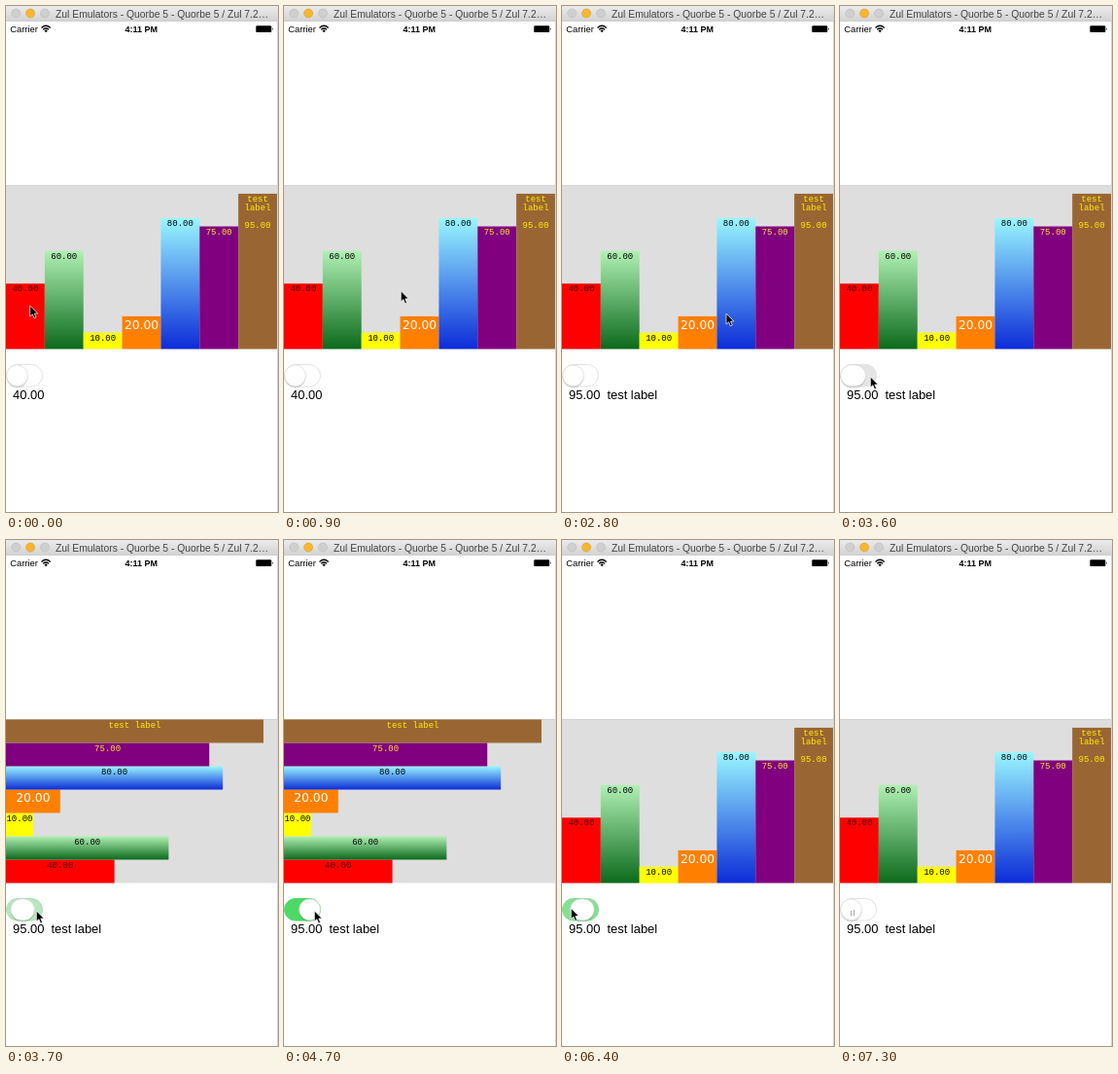
An HTML page that plays this animation: 280 by 520 pixels, repeating every 8.4 s.

```html
<!DOCTYPE html>
<html lang="en">
<head>
<meta charset="utf-8">
<title>Bar chart demo</title>
<style>
  html, body { margin: 0; width: 100%; height: 100%; overflow: hidden; background: #fff; }
  svg { display: block; width: 280px; height: 520px; }
  text { font-family: "Liberation Sans", Arial, sans-serif; white-space: pre; }
  .mono { font: 9px "Liberation Mono", "Courier New", monospace; text-anchor: middle; }
  .big { font: 12.3px "DejaVu Sans", Verdana, sans-serif; text-anchor: middle; }
</style>
</head>
<body>
<svg viewBox="0 0 280 520">
  <defs>
    <linearGradient id="title" x2="0" y2="1">
      <stop stop-color="#ebebeb"/><stop offset="1" stop-color="#d3d3d3"/>
    </linearGradient>
    <linearGradient id="green" x2="0" y2="1">
      <stop stop-color="#b0f0b4"/><stop offset="1" stop-color="#0c6a1c"/>
    </linearGradient>
    <linearGradient id="blue" x2="0" y2="1">
      <stop stop-color="#98f6ff"/><stop offset="1" stop-color="#0c2cd8"/>
    </linearGradient>
  </defs>

  <rect width="280" height="520" fill="#fff"/>

  <rect width="280" height="15.5" fill="url(#title)"/>
  <path d="M0 15.5H280" stroke="#c4c4c4" stroke-width=".7"/>
  <g stroke-width=".6">
    <circle cx="10.3" cy="7.5" r="4.5" fill="#cfcfcf" stroke="#bbb"/>
    <circle cx="25.1" cy="7.5" r="4.5" fill="#f8b630" stroke="#dc9c24"/>
    <circle cx="40" cy="7.5" r="4.5" fill="#cfcfcf" stroke="#bbb"/>
  </g>
  <text x="51" y="11.5" font-size="10.35" fill="#444">Zul Emulators - Quorbe 5 - Quorbe 5 / Zul 7.2…</text>

  <text x="4.2" y="27" font-size="9.4">Carrier</text>
  <g fill="none" stroke="#000" stroke-width="1.4">
    <path d="M36.5 22.4Q41.1 18.2 45.7 22.4M38.2 24.3Q41.1 21.8 44 24.3"/>
    <path d="M39.4 25.3L41.1 27.2L42.8 25.3Q41.1 23.9 39.4 25.3Z" fill="#000" stroke="none"/>
  </g>
  <text x="139.3" y="27" font-size="9" font-weight="bold" text-anchor="middle">4:11 PM</text>
  <rect x="257.3" y="20.3" width="16" height="6.8" rx="1.2"/>
  <path d="M274 22.2q1.6 1.4 0 2.8z"/>

  <rect y="184.5" width="279" height="168" fill="#dedede"/>
  <path d="M0 184.4H279" stroke="#c8c8c8" stroke-width=".7"/>
  <g id="columns"></g>
  <g id="rows"></g>
  <path d="M279.5 16V520" stroke="#d6d6d6"/>

  <rect id="track" x=".5" y="368.5" width="37" height="22.6" rx="11.3" stroke-width="1"/>
  <rect id="shade" y="370.4" height="22" rx="11" fill="#000" opacity=".14"/>
  <rect id="knob" y="368.9" height="21.8" rx="10.9" fill="#fff" stroke="#d2d2d2" stroke-width=".6"/>
  <text id="value" x="7.1" y="404" font-size="12.9"></text>

  <path id="cursor" d="M0 0V12L2.8 9.5L4.7 14L6.8 13.1L4.9 8.8L8.6 8.6Z" stroke="#fff" stroke-width=".8"/>
  <path id="trace" d="M11.5 381V386.5M14.5 380V386.5" stroke="#a0a0a0" stroke-width=".9"/>
</svg>
<script>
const LOOP = 8400, STEP = 100;
const TOP = 184.5, WIDTH = 279, HEIGHT = 168;
const $ = id => document.getElementById(id);

const bars = [
  { v: 40, fill: '#f00', ink: '#4a0000' },
  { v: 60, fill: 'url(#green)', ink: '#000' },
  { v: 10, fill: '#ff0', ink: '#000' },
  { v: 20, fill: '#ff8000', ink: '#fff', big: true },
  { v: 80, fill: 'url(#blue)', ink: '#000' },
  { v: 75, fill: '#800080', ink: '#ffe81a' },
  { v: 95, fill: '#996633', ink: '#ffee00', label: 'test label' }
];

function add(parent, tag, attrs, text) {
  const el = document.createElementNS('http://www.w3.org/2000/svg', tag);
  for (const k in attrs) el.setAttribute(k, attrs[k]);
  if (text) el.textContent = text;
  parent.appendChild(el);
}

function drawBar(group, bar, x, y, width, height, lines) {
  add(group, 'rect', { x, y, width, height, fill: bar.fill });
  lines.forEach((line, i) => add(group, 'text', {
    class: bar.big ? 'big' : 'mono',
    x: x + width / 2,
    y: y + (bar.big ? 12.7 : 8) + i * 9,
    fill: bar.ink
  }, line));
}

const column = WIDTH / bars.length, row = HEIGHT / bars.length;
bars.forEach((bar, i) => {
  const num = bar.v.toFixed(2), part = bar.v / 100, h = part * HEIGHT;
  drawBar($('columns'), bar, i * column, TOP + HEIGHT - h, column, h,
    bar.label ? [...bar.label.split(' '), '', num] : [num]);
  drawBar($('rows'), bar, 0, TOP + (bars.length - 1 - i) * row, part * WIDTH, row,
    [bar.label || num]);
});

const ramp = (t, a, b) => Math.min(1, Math.max(0, (t - a) / (b - a)));
const smooth = u => u * u * (3 - 2 * u);
const mix = (a, b, u) => a + (b - a) * u;
const mixColor = (a, b, u) => `rgb(${a.map((c, i) => Math.round(mix(c, b[i], u)))})`;

// start, end, x, y
const moves = [
  [600, 1300, 267.6, 269.5],
  [2400, 3300, 31.3, 381],
  [4700, 5500, 11, 379],
  [5700, 6000, 9.3, 378.5]
];

function cursorAt(t) {
  let x = 24.7, y = 308;
  for (const [a, b, tx, ty] of moves) {
    const u = smooth(ramp(t, a, b));
    x = mix(x, tx, u);
    y = mix(y, ty, u);
  }
  return [x, y];
}

const press = (t, at) => ramp(t, at - 200, at) - ramp(t, at, at + 300);
const slide = (t, at) => 1 - (1 - ramp(t, at, at + 400)) ** 1.5;
const show = (id, on) => $(id).setAttribute('visibility', on ? 'visible' : 'hidden');

function drawSwitch(t) {
  const on = slide(t, 3600) - slide(t, 6300);
  const held = press(t, 3600) + press(t, 6300);
  const width = 21.8 + 4 * held;
  const x = mix(.6, 37.4 - width, on);
  const off = 255 - 26 * held;
  const green = [76, 217, 100];
  $('track').setAttribute('fill', mixColor([off, off, off], green, on));
  $('track').setAttribute('stroke', mixColor([226, 226, 226], green, on));
  for (const id of ['knob', 'shade']) {
    $(id).setAttribute('x', x);
    $(id).setAttribute('width', width);
  }
}

function render(time) {
  const t = Math.floor((time % LOOP) / STEP) * STEP;
  const flipped = t >= 3700 && t < 6400;
  show('rows', flipped);
  show('columns', !flipped);
  show('cursor', t < 7000);
  show('trace', t >= 7000);
  $('cursor').setAttribute('transform', `translate(${cursorAt(t)}) scale(.92)`);
  $('value').textContent = t < 1700 ? '40.00' : '95.00\u00a0\u00a0test label';
  drawSwitch(t);
}

const start = performance.now();
function tick() {
  render(performance.now() - start);
  requestAnimationFrame(tick);
}
tick();
</script>
</body>
</html>
```
